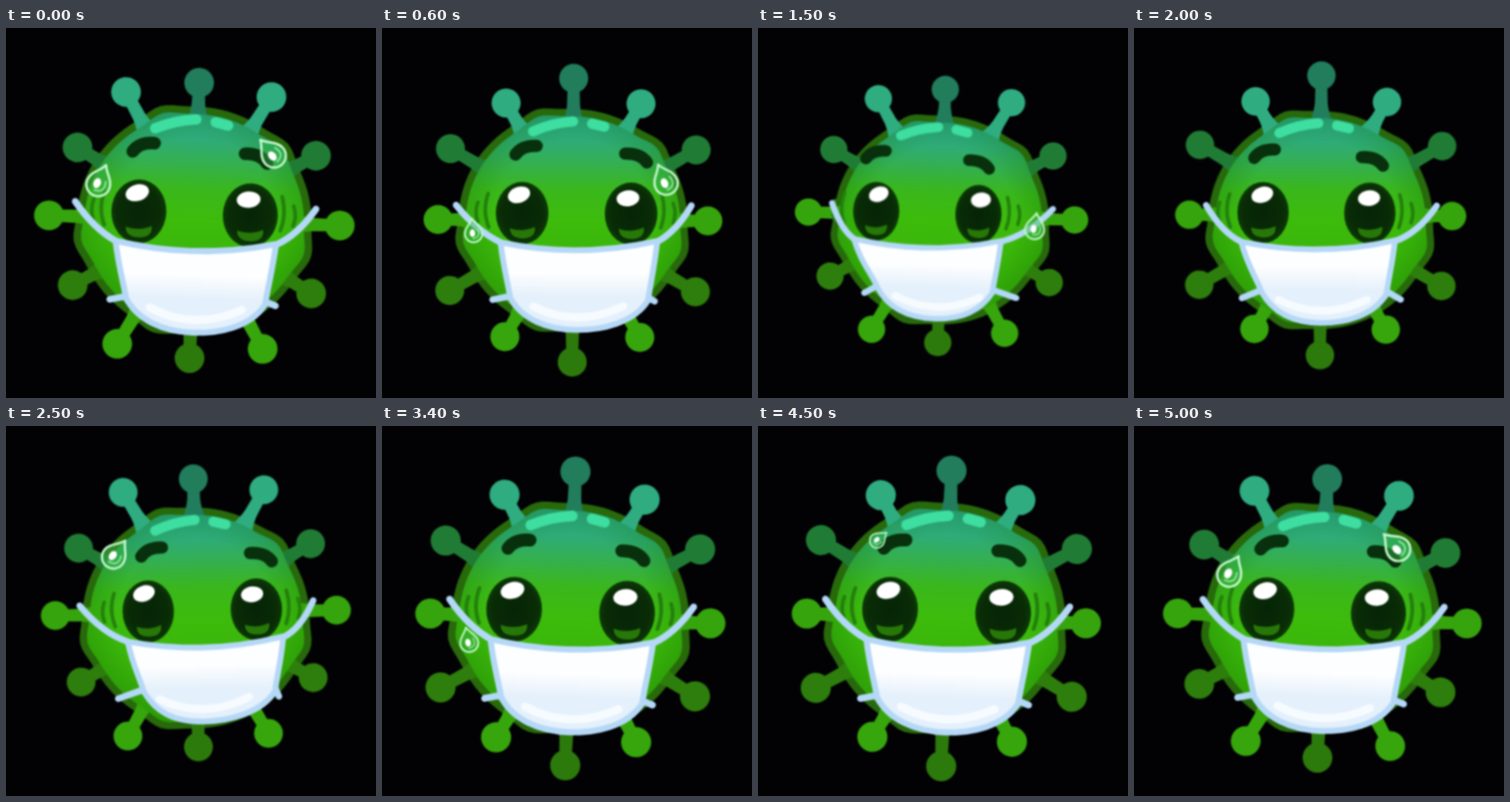
An HTML page that plays this animation: 498 px wide and 498 px high, repeating every 5.1 s.

```html
<!DOCTYPE html>
<html lang="en">
<head>
<meta charset="utf-8">
<title>Masked virus</title>
<style>
  html, body { margin: 0; width: 100%; height: 100%; overflow: hidden; background: #020104; }
  svg { display: block; width: 100vw; height: 100vh; }
  #virus { filter: blur(1.1px); }
</style>
</head>
<body>
<svg viewBox="0 0 498 498">
  <defs>
    <linearGradient id="skin" gradientUnits="userSpaceOnUse" x1="0" y1="-150" x2="0" y2="150">
      <stop offset="0" stop-color="#2aa58a"/>
      <stop offset=".14" stop-color="#2fac78"/>
      <stop offset=".25" stop-color="#35b04c"/>
      <stop offset=".36" stop-color="#3ab71c"/>
      <stop offset=".5" stop-color="#3dbc0c"/>
      <stop offset="1" stop-color="#34a808"/>
    </linearGradient>
    <radialGradient id="edge" gradientUnits="userSpaceOnUse" cx="0" cy="0" r="156">
      <stop offset=".7" stop-color="#107000" stop-opacity="0"/>
      <stop offset="1" stop-color="#107000" stop-opacity=".3"/>
    </radialGradient>
    <linearGradient id="cloth" gradientUnits="userSpaceOnUse" x1="0" y1="40" x2="0" y2="150">
      <stop offset=".3" stop-color="#fdfeff"/>
      <stop offset=".6" stop-color="#e4f0fb"/>
    </linearGradient>
    <radialGradient id="pupil">
      <stop offset="0" stop-color="#062406"/>
      <stop offset=".8" stop-color="#092c06"/>
      <stop offset="1" stop-color="#0c3a06"/>
    </radialGradient>
  </defs>
  <rect width="498" height="498" fill="#020104"/>
  <g id="virus" stroke-linecap="round" stroke-linejoin="round"></g>
</svg>
<script>
const LOOP = 5100, STEP = 100, REST = 190.5;
const NS = 'http://www.w3.org/2000/svg';
const root = document.getElementById('virus');

function set(el, attrs) {
  for (const k in attrs) el.setAttribute(k, attrs[k]);
}
function add(tag, attrs, parent = root) {
  const el = document.createElementNS(NS, tag);
  set(el, attrs);
  return parent.appendChild(el);
}
const line = (stroke, width) => add('path', { fill: 'none', stroke, 'stroke-width': width });
const lerp = (a, b, k) => a + (b - a) * k;
const clamp = x => Math.min(1, Math.max(0, x));

// Poses: centre x, centre y, spike reach, tilt, face turn, face drop
const ahead = [253.5, 259, 192, 2, 0, 0];
const right = [257, 258.7, 185, .3, 5, 0];
const left = [247, 253, 176, 1.7, -21, 6];
const up = [255.5, 251.5, 186, -1.1, 9, 7];
const PATH = [[0, ahead], [600, right], [1500, left], [2500, up], [3400, ahead], [LOOP, ahead]];

function poseAt(t) {
  const i = PATH.findIndex(([end]) => t < end);
  const [t0, a] = PATH[i - 1], [t1, b] = PATH[i];
  const k = (t - t0) / (t1 - t0);
  return a.map((v, j) => lerp(v, b[j], k * k * (3 - 2 * k)));
}

// Lumpy outline; angles run clockwise from the top
function blob(base) {
  let d = 'M';
  for (let a = 0; a < 360; a += 3) {
    let r = base;
    for (const at of [-18, 48, 106, 198, 258]) {
      const gap = (a - at + 540) % 360 - 180;
      r += 7 * Math.exp(-gap * gap / 70);
    }
    const p = a * Math.PI / 180;
    d += `${(1.03 * r * Math.sin(p)).toFixed(1)} ${(-r * Math.cos(p)).toFixed(1)} `;
  }
  return d + 'Z';
}

const rim = add('path', { d: blob(153), fill: '#27690b' });

const HUES = ['#217d5c', '#2fac80', '#207c34', '#36a40c', '#2d7e0c', '#36a60c', '#2d7a0c'];
const spikes = Array.from({ length: 12 }, (_, i) => {
  const g = add('g', { fill: HUES[Math.min(i, 12 - i)], transform: `rotate(${i * 30})` });
  return { stem: add('path', {}, g), ball: add('circle', { r: 20 }, g) };
});

const body = add('g', {});
for (const paint of ['skin', 'edge']) add('path', { d: blob(143), fill: `url(#${paint})` }, body);

const shine = line('#3edda0', 14);
const marks = line('#23800c', 5);
const brows = line('#08300c', 17);

const eyes = [-1, 1].map(side => {
  const g = add('g', {});
  add('ellipse', { rx: 37, ry: 43, fill: 'url(#pupil)' }, g);
  add('path', { d: 'M-17 21Q0 27 18 19Q20 34 2 35Q-17 35-17 21Z', fill: '#277808' }, g);
  const glint = add('ellipse', { rx: 16, ry: 11, fill: '#fff' }, g);
  return { side, g, glint };
});

const straps = line('#b3d8f8', 9);
const mask = add('path', { fill: 'url(#cloth)', stroke: '#b6d8f7', 'stroke-width': 8 });
const glow = line('#f6fbff', 11);

function makeDrop() {
  const g = add('g', { fill: 'none' });
  add('path', {
    d: 'M0-24C4-14 16-8 16 4A16 16 0 0 1-16 4C-16-8-4-14 0-24Z',
    fill: '#35b44a', 'fill-opacity': .45, stroke: '#c2f7cb', 'stroke-width': 3.2
  }, g);
  add('path', { d: 'M8-3Q13 12-2 13', stroke: '#8be39a', 'stroke-width': 2.5 }, g);
  add('ellipse', { cx: -2, cy: 3, rx: 5, ry: 7, fill: '#fff' }, g);
  return g;
}

// Sweat slides down the rim; speed in degrees per second
const drops = [
  { side: -1, start: 2200, life: 1.5, speed: 57 },
  { side: -1, start: 4350, life: 1.65, speed: 45 },
  { side: 1, start: 4750, life: 2.2, speed: 32 }
].map(d => ({ ...d, g: makeDrop() }));

function drawMask(u, v) {
  const y = 29 + v, lx = -105 + 1.08 * u, rx = 111 + 1.08 * u;
  const bl = -88 + .5 * u + 1.3 * v, br = 99 + u, mid = 4 + .4 * u;
  set(mask, {
    d: `M${lx} ${y + 2}Q${(lx + rx) / 2} ${y + 24} ${rx} ${y - 1}` +
       `C${lerp(rx, br, .3)} ${y + 34} ${lerp(rx, br, .8)} 90 ${br} 110` +
       `C${br - 19} 141 ${mid + 34} 151 ${mid} 151` +
       `C${mid - 42} 151 ${bl + 16} 136 ${bl} 108` +
       `C${lerp(lx, bl, .75)} 88 ${lerp(lx, bl, .3)} ${y + 36} ${lx} ${y + 2}Z`
  });
  set(glow, { d: `M${mid - 60} 119Q${mid} 149 ${mid + 64} 118` });
  set(straps, {
    d: `M-161 ${v - 20}Q${(lx - 161) / 2 - 2} ${y / 2 + v + 1} ${lx} ${y + 2}` +
       `M163 ${v - 21}Q${(rx + 163) / 2 + 3} ${y / 2 + v} ${rx} ${y}` +
       `M-110 ${110 + v}L${bl} 105M113 ${111 + v}L${br} 106`
  });
}

function draw(t) {
  const [cx, cy, size, tilt, u, v] = poseAt(t);
  // Neighbouring spikes stretch in turn while the whole body breathes
  const beat = Math.cos(2 * Math.PI * t / (LOOP / 4) - .42);
  const reach = size - 1.5 * beat, s = reach / REST;
  const shift = (x, y) => ({ transform: `translate(${x} ${y})` });

  set(root, { transform: `translate(${cx} ${cy}) rotate(${tilt}) scale(${s})` });
  set(rim, shift(0, v));
  set(body, shift(0, v));

  spikes.forEach(({ stem, ball }, i) => {
    const tip = (reach + (i % 2 ? 5.7 : -5.7) * beat) / s;
    set(stem, { d: `M-8 ${-tip}L-9 -158Q-10 -146 -15 -134H15Q10 -146 9 -158L8 ${-tip}Z` });
    set(ball, { cy: -tip });
  });

  set(shine, { d: 'M-57-122Q-30-134-2-136M24-133L41-129', ...shift(.3 * u, v) });
  set(marks, {
    d: 'M-122-36Q-130-12-121 10M-136-24Q-141-10-136 3M117-36Q124-12 116 10M133-24Q138-10 133 3',
    ...shift(u, v)
  });
  set(brows, { d: 'M-86-90Q-77-103-57-102M65-92Q86-93 95-80', ...shift(1.3 * u, 1.5 * v) });

  for (const { side, g, glint } of eyes) {
    const thin = 1 - .004 * Math.abs(u);
    set(g, { transform: `translate(${side * 75 + u} ${-9.5 + .9 * v}) scale(${thin} 1)` });
    set(glint, { transform: `translate(${-3 - .3 * u} ${2 * side - 23}) rotate(${6 * side - 12})` });
  }

  drawMask(u, v);

  for (const { side, start, life, speed, g } of drops) {
    const age = (t - start + LOOP) % LOOP / 1000;
    const angle = 54 - speed * age, a = angle * Math.PI / 180;
    const grow = clamp(age / .25) * clamp((life - age) / .4);
    set(g, {
      transform: `translate(${side * 138 * Math.cos(a)} ${-138 * Math.sin(a)}) rotate(${-side * angle}) scale(${grow})`,
      visibility: grow > .02 ? 'visible' : 'hidden'
    });
  }
}

const begin = performance.now();
function tick() {
  const t = (performance.now() - begin) % LOOP;
  draw(Math.floor(t / STEP) * STEP);
  requestAnimationFrame(tick);
}
tick();
</script>
</body>
</html>
```
